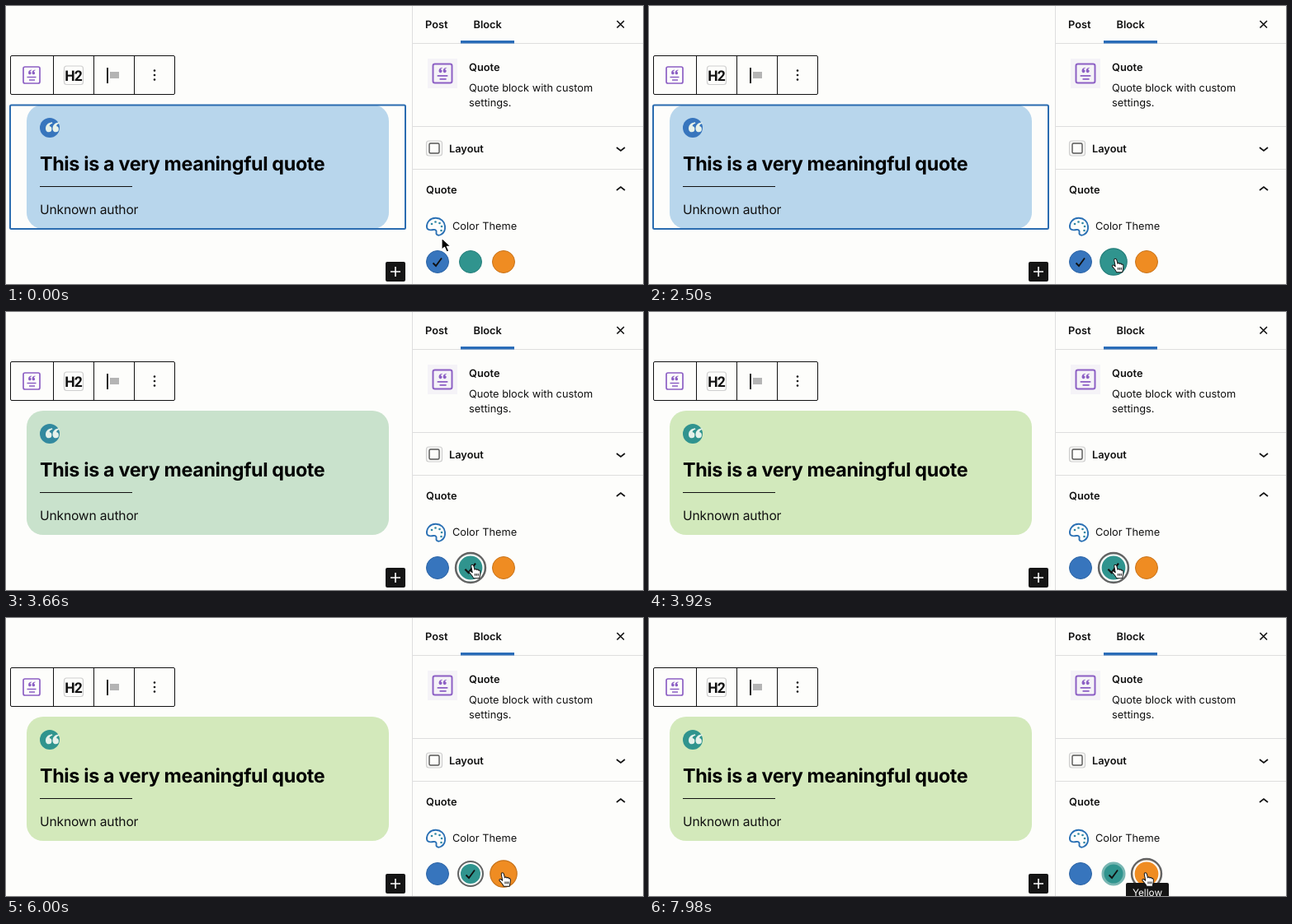
An HTML page for the animation above (8000 ms loop, 772 by 338 pixels).

```html
<!DOCTYPE html>
<html lang="en">
<head>
<meta charset="utf-8">
<title>Quote block color theme</title>
<style>
html, body { margin: 0; width: 100%; height: 100%; overflow: hidden; background: #fdfdfb; }
svg { display: block; width: 772px; height: 338px; }
text { font-family: Inter, "Open Sans", sans-serif; font-size: 12.8px; fill: #111; text-rendering: geometricPrecision; }
.b { font-weight: 600; }
.line { stroke: #dedede; fill: none; }
.ink { stroke: #111; fill: none; }
.title { font-size: 23.3px; font-weight: 700; letter-spacing: -.34px; fill: #000; }
.author { font-size: 15.6px; letter-spacing: -.16px; }
.level { font-family: Roboto, sans-serif; font-size: 17.5px; font-weight: 600; letter-spacing: -1px; }
</style>
</head>
<body>
<svg viewBox="0 0 772 338">
  <defs>
    <g id="quoteIcon" fill="none" stroke="#8c5fc4" stroke-width="1.7">
      <rect x="-10" y="-10" width="20" height="20" rx="2"/>
      <path d="M-5.5 2.5H5.5M-3 6H4" stroke-width="1.6"/>
      <g fill="#8c5fc4" stroke="none">
        <use href="#mark" transform="translate(-2 -3) scale(.55)"/>
        <use href="#mark" transform="translate(2.5 -3) scale(.55)"/>
      </g>
    </g>
    <path id="mark" d="M3.4-6.2C-1.5-5.6-3.8-2.6-3.4 1.2C-3.1 3.1-1.8 4.2 0 4.2A3.2 3.2 0 0 0 .5-2.1C.7-3.5 1.8-4.6 3.8-5.1Z"/>
  </defs>
  <rect width="772" height="338" fill="#fdfdfb"/>

  <g class="ink">
    <rect x="5.5" y="60.5" width="199" height="47" rx="1.5"/>
    <path d="M57.5 60V108M106.5 60V108M155.5 60V108"/>
  </g>
  <use href="#quoteIcon" x="31" y="84"/>
  <rect x="70.5" y="73" width="23" height="22.5" rx="3" fill="#fdfdfb" stroke="#cfcfcf" stroke-width="1.2"/>
  <text class="level" x="81.5" y="90.5" text-anchor="middle">H2</text>
  <rect x="122" y="75" width="2" height="19" fill="#222"/>
  <rect x="126" y="80" width="11" height="8" fill="#b4b4b4"/>
  <g fill="#111"><circle cx="180" cy="78.5" r="1.3"/><circle cx="180" cy="84" r="1.3"/><circle cx="180" cy="89.5" r="1.3"/></g>

  <rect id="card" x="25" y="120" width="439" height="151" rx="20"/>
  <rect id="outline" x="5" y="120.5" width="479" height="150.5" rx="1.5" fill="none" stroke="#2b6cb0" stroke-width="2"/>
  <circle id="badge" cx="53" cy="148" r="12"/>
  <g fill="#e6f1ea">
    <use href="#mark" transform="translate(52 148.500) scale(1.15)"/>
    <use href="#mark" transform="translate(60.500 148.500) scale(1.15)"/>
  </g>
  <text class="title" x="41" y="200">This is a very meaningful quote</text>
  <path class="ink" d="M41 219.5H153"/>
  <text class="author" x="41" y="252.5">Unknown author</text>

  <rect x="460" y="311" width="24" height="24" rx="2" fill="#151515"/>
  <path d="M466 323H478M472 317V329" stroke="#fff" stroke-width="1.6"/>

  <path class="line" d="M492.5 0V338M493 45.5H772M493 146.5H772M493 198.5H772"/>
  <text class="b" x="508" y="27">Post</text>
  <text class="b" x="566.5" y="27">Block</text>
  <rect x="551" y="42" width="65" height="3.5" fill="#2a6cb8"/>
  <path class="ink" stroke-width="1.6" d="M740.5 18L749 26.5M749 18L740.5 26.5"/>
  <rect x="511" y="64" width="36" height="36" fill="#f5f3f7"/>
  <use href="#quoteIcon" transform="translate(529 82) scale(1.15)"/>
  <text class="b" x="561" y="79">Quote</text>
  <text x="561" y="104">Quote block with custom</text>
  <text x="561" y="122">settings.</text>
  <rect x="509.5" y="164" width="19" height="18" rx="3" fill="#f8f8f6" stroke="#cfcfcf" stroke-width="1.2"/>
  <rect x="513" y="167" width="12" height="12" rx="1.5" fill="#fdfdfb" stroke="#555" stroke-width="1.4"/>
  <text class="b" x="537" y="178">Layout</text>
  <text class="b" x="509" y="228">Quote</text>
  <g class="ink" stroke-width="1.7"><path d="M740 172L745 176L750 172"/><path d="M740 224L745 220L750 224"/></g>
  <path d="M521 257.800C514 257.500 509.500 263 510 269C510.500 273 515 272.500 518 272C521 271.500 522 273.500 521.500 275.500C521 278.500 524 279.500 527 278C531 276 532.500 272 532 267.500C531.500 262 527 258 521 257.800Z" fill="none" stroke="#2a70b4" stroke-width="1.9"/>
  <g fill="#2f88a4"><circle cx="516" cy="265" r="1.3"/><circle cx="520.500" cy="262.500" r="1.3"/><circle cx="525.500" cy="264" r="1.3"/><circle cx="528" cy="268" r="1.3"/><circle cx="527.500" cy="273" r="1.3"/></g>
  <text x="541" y="272">Color Theme</text>

  <g id="swatches"></g>
  <g id="tip">
    <rect y="322" height="24" rx="2" fill="#151515"/>
    <text y="337.500" text-anchor="middle" style="font-size:11.8px;fill:#fff"></text>
  </g>
  <g id="cursor" stroke-linejoin="round">
    <path id="arrow" d="M0 0V14.500L3.500 11.300L6 17L8.800 15.800L6.300 10.300H11Z" fill="#000" stroke="#fff" stroke-width="1.2"/>
    <path id="hand" transform="scale(.9 .95)" d="M-2 .8C-2-1.200 1-1.200 1.500.8L2.800 5.600C3.500 4.200 5.300 4.500 5.600 5.900C6.300 4.900 7.900 5.200 8.200 6.700C9 6 10.300 6.500 10.400 8C10.600 11 9.800 12.500 9.200 16.500H1.200C.5 14-2.200 11.800-4.300 9.300C-5.300 7.800-3.300 6.600-1.800 7.900L-.3 9.200Z M3.300 10.500V13.500M5.500 10.500V13.500M7.600 10.500V13.500" fill="#fff" stroke="#111" stroke-width="1.100"/>
  </g>
</svg>
<script>
const LOOP = 8000;
const $ = id => document.getElementById(id);
const set = (el, attrs) => { for (const k in attrs) el.setAttribute(k, attrs[k]); };
const show = (el, on) => { el.style.display = on ? '' : 'none'; };
const make = (tag, parent, attrs) => {
  const el = document.createElementNS('http://www.w3.org/2000/svg', tag);
  set(el, attrs);
  return parent.appendChild(el);
};
const ramp = (t, a, b) => {
  const p = Math.min(1, Math.max(0, (t - a) / (b - a)));
  return p * p * (3 - 2 * p);
};
const mix = (a, b, p) => `rgb(${a.map((v, i) => Math.round(v + (b[i] - v) * p))})`;

// Times of the pointer events, in ms
const enterGreen = 540, leaveGreen = 4745, enterOrange = 4940;
const pressGreen = 2950, clickGreen = 3180, pressOrange = 7700;
const hoverTime = 300;

const path = [[0, 528, 282], [800, 560, 301], [1400, 565.5, 308], [4250, 565.5, 308], [5400, 602, 310.5]];

function swatch(x, fill, edge) {
  const g = make('g', $('swatches'), {});
  return {
    x, g,
    disc: make('circle', g, { r: 13.5, fill, stroke: edge }),
    halo: make('circle', g, { r: 13, fill: 'none', stroke: '#78b6b2', 'stroke-width': 3 }),
    gap: make('circle', g, { r: 13, fill: 'none', stroke: '#fdfdfb', 'stroke-width': 2 }),
    ring: make('circle', g, { r: 15, fill: 'none', stroke: '#636363', 'stroke-width': 2 }),
    check: make('path', g, { d: 'M-5.500 1.500L-2 5L5-4.500', fill: 'none', stroke: '#111', 'stroke-width': 1.8 })
  };
}

function drawSwatch(s, scale, focus, checked, halo) {
  set(s.g, { transform: `translate(${s.x} 311) scale(${scale})` });
  show(s.gap, focus);
  show(s.ring, focus);
  show(s.check, checked);
  show(s.halo, halo);
}

const blue = swatch(523, '#3775bd', '#2d65a6');
const green = swatch(563, '#30948e', '#27807c');
const orange = swatch(603, '#ef8c22', '#c8741c');

function drawTip(label, x, width) {
  show($('tip'), label);
  if (!label) return;
  const [box, text] = $('tip').children;
  set(box, { x: x - width / 2, width });
  set(text, { x });
  text.textContent = label;
}

function drawCursor(t) {
  let [, x, y] = path[0];
  for (let i = 1; i < path.length; i++) {
    const p = ramp(t, path[i - 1][0], path[i][0]);
    x += (path[i][1] - path[i - 1][1]) * p;
    y += (path[i][2] - path[i - 1][2]) * p;
  }
  const hand = t >= enterGreen && t < leaveGreen || t >= enterOrange;
  set($('cursor'), { transform: `translate(${x} ${y})` });
  show($('hand'), hand);
  show($('arrow'), !hand);
}

function draw(t) {
  const theme = ramp(t, clickGreen - 30, 4000);
  set($('card'), { fill: mix([184, 214, 236], [211, 233, 187], theme) });
  set($('badge'), { fill: mix([55, 117, 189], [48, 148, 142], theme) });
  show($('outline'), t < pressGreen);

  const overGreen = ramp(t, enterGreen, enterGreen + hoverTime) - ramp(t, leaveGreen, leaveGreen + hoverTime);
  const overOrange = ramp(t, enterOrange, enterOrange + hoverTime);
  const greenFocus = t >= pressGreen && t < pressOrange;
  drawSwatch(blue, 1, false, t < clickGreen, false);
  drawSwatch(green, 1 + .2 * overGreen, greenFocus, t >= clickGreen, t >= pressOrange);
  drawSwatch(orange, 1 + .2 * overOrange, t >= pressOrange, false, false);

  if (t >= 2600 && t < clickGreen) drawTip('Green', 563, 50);
  else if (t >= 7050) drawTip('Yellow', 604, 52);
  else drawTip('');
  drawCursor(t);
}

let start;
function tick(now) {
  start ??= now;
  draw((now - start) % LOOP);
  requestAnimationFrame(tick);
}
draw(0);
requestAnimationFrame(tick);
</script>
</body>
</html>
```
